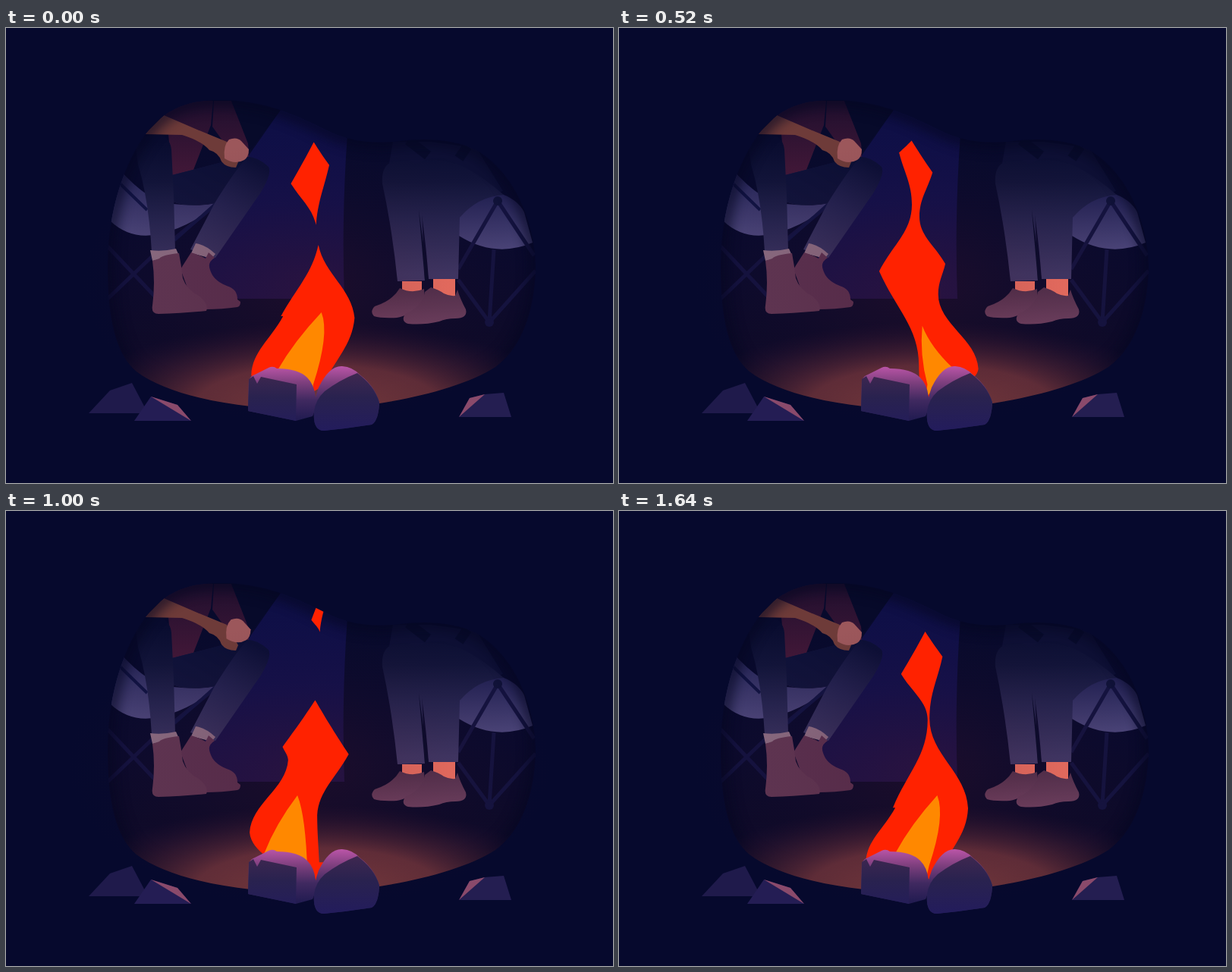
These frames come from a looping animation (800 px wide and 600 px high, 1680 ms). An HTML page:

```html
<!DOCTYPE html>
<html lang="en">
<head>
<meta charset="utf-8">
<title>Campfire</title>
<style>
html, body { margin: 0; width: 100%; height: 100%; overflow: hidden; background: #06092d; }
svg { display: block; width: 100vw; height: 100vh; }
</style>
</head>
<body>
<svg viewBox="0 0 800 600">
<defs>
  <clipPath id="blob"><path id="edge" d="M290 95C245 94 215 103 188 135C155 176 134 245 134 312C134 385 145 430 172 453C215 486 310 503 395 503C480 502 590 482 645 447C685 418 698 360 698 312C696 255 670 190 620 161C590 146 550 145 520 149C480 154 450 148 425 136C385 116 345 97 290 95Z"/></clipPath>
  <linearGradient id="air" x2="0" y2="1"><stop stop-color="#070a2c"/><stop offset=".5" stop-color="#0a0a2d"/><stop offset=".75" stop-color="#0d0a29"/><stop offset="1" stop-color="#170d2b"/></linearGradient>
  <radialGradient id="glow"><stop stop-color="#84403f" stop-opacity=".95"/><stop offset=".5" stop-color="#74363c" stop-opacity=".85"/><stop offset=".75" stop-color="#4a2234" stop-opacity=".5"/><stop offset="1" stop-color="#2a1230" stop-opacity="0"/></radialGradient>
  <radialGradient id="haze"><stop stop-color="#50182c" stop-opacity=".26"/><stop offset=".6" stop-color="#40142a" stop-opacity=".08"/><stop offset="1" stop-color="#301024" stop-opacity="0"/></radialGradient>
  <linearGradient id="tent" x2="0" y2="1"><stop stop-color="#0e0f45"/><stop offset=".5" stop-color="#12104a"/><stop offset="1" stop-color="#1c1146"/></linearGradient>
  <linearGradient id="jean" gradientUnits="userSpaceOnUse" x1="0" y1="150" x2="0" y2="325"><stop stop-color="#090c2f"/><stop offset=".3" stop-color="#121439"/><stop offset=".6" stop-color="#25244f"/><stop offset="1" stop-color="#3f3765"/></linearGradient>
  <linearGradient id="shin" gradientUnits="userSpaceOnUse" x1="325" y1="175" x2="255" y2="298"><stop stop-color="#0c0f36"/><stop offset=".5" stop-color="#232250"/><stop offset="1" stop-color="#393360"/></linearGradient>
  <linearGradient id="seat" x2="0" y2="1"><stop stop-color="#201f50"/><stop offset="1" stop-color="#4a4478"/></linearGradient>
  <linearGradient id="shirt" gradientUnits="userSpaceOnUse" x1="0" y1="96" x2="0" y2="190"><stop stop-color="#200f2e"/><stop offset="1" stop-color="#401737"/></linearGradient>
  <linearGradient id="shoe" x2="0" y2="1"><stop stop-color="#52304c"/><stop offset="1" stop-color="#6d405f"/></linearGradient>
  <linearGradient id="pink" gradientUnits="userSpaceOnUse" x1="0" y1="446" x2="0" y2="515"><stop stop-color="#bb55a8"/><stop offset=".3" stop-color="#80407f"/><stop offset=".65" stop-color="#402960"/><stop offset="1" stop-color="#231c52"/></linearGradient>
  <linearGradient id="stone" gradientUnits="userSpaceOnUse" x1="0" y1="458" x2="0" y2="530"><stop stop-color="#3d2750"/><stop offset=".4" stop-color="#29224f"/><stop offset="1" stop-color="#231c5c"/></linearGradient>
  <filter id="soft" x="-10%" y="-10%" width="120%" height="120%" color-interpolation-filters="sRGB"><feGaussianBlur stdDeviation="8"/></filter>
</defs>
<rect x="-2000" y="-2000" width="4800" height="4800" fill="#06092d"/>
<g clip-path="url(#blob)">
  <rect x="130" y="90" width="575" height="420" fill="url(#air)"/>
  <path d="M362 108L450 140Q442 250 446 357H262V260L322 165Z" fill="url(#tent)"/>

  <!-- left camper -->
  <g fill="none" stroke="#13123f" stroke-width="5"><path d="M134 288L200 358M197 297L133 358M275 234L212 286"/></g>
  <path d="M148 185Q190 232 220 232Q255 236 277 231Q250 259 205 271Q165 281 137 254Z" fill="url(#seat)"/>
  <path d="M148 203L186 240M276 232L222 280" fill="none" stroke="#111342" stroke-width="4"/>
  <path d="M206 115Q235 94 273 96L270 128L247 187L219 194L214 140Z" fill="url(#shirt)"/>
  <path d="M274 96H297L319 150L320 172L290 155L272 130Z" fill="url(#shirt)"/>
  <path d="M297 96L362 108L322 160Z" fill="#070a2a"/>
  <path d="M219 194L296 174Q325 162 346 183Q351 192 335 218L276 303L243 292L275 231Q240 237 220 229Z" fill="url(#shin)"/>
  <path d="M219 194L296 174L318 170Q300 190 275 231Q240 237 220 229Z" fill="#0a0e34" opacity=".8"/>
  <path d="M171 155Q178 139 200 141Q216 143 218 160L221 220L223 293L192 295Q188 225 174 180Z" fill="url(#jean)"/>
  <path d="M208 115L183 140L232 141Q258 149 268 161Q280 164 284 176Q290 184 303 184L306 177L291 150L252 134Z" fill="#6e3b39"/>
  <path id="fist" d="M288 172Q286 155 294 147Q304 143 310 149L320 160Q320 170 314 174Q302 181 288 172Z" fill="#9c575b"/>
  <path d="M250 284Q263 286 276 298L271 304L244 297Z" fill="#8b6c82"/>
  <path d="M244 296Q254 299 263 304L267 296L275 303Q265 309 269 319Q273 333 291 340Q305 344 305 358L309 361Q309 367 305 368Q285 371 262 371L240 345L230 318Z" fill="#5b3150"/>
  <path d="M190 293Q207 295 224 291L228 300Q210 304 193 307Z" fill="#8b6c82"/>
  <path d="M193 307L202 304Q206 299 228 297Q231 313 233 330Q238 345 254 353Q268 364 264 373Q235 376 201 377Q191 377 193 366Q197 335 193 307Z" fill="#603653"/>

  <!-- right camper -->
  <path d="M510 150H560L620 158L655 215L600 235L545 190L505 178Z" fill="#0e1035"/>
  <path d="M530 148L556 168M608 156L597 172" fill="none" stroke="#080b2b" stroke-width="13"/>
  <path d="M596 250Q625 219 648 217Q674 225 683 243L694 283Q645 304 597 274Z" fill="url(#seat)"/>
  <g fill="none" stroke="#14133f" stroke-width="5"><path d="M648 228L596 318M648 228L696 300M643 292L637 388M596 332L637 388L698 320"/></g>
  <circle cx="648" cy="228" r="6" fill="#101238"/><circle cx="637" cy="388" r="6" fill="#14133f"/>
  <path d="M496 205Q494 178 514 175Q530 172 538 178L548 240L552 333L516 334Q509 265 496 205Z" fill="url(#jean)"/>
  <path d="M537 184Q546 170 577 172Q612 182 656 220Q622 222 598 250L596 331L557 331Q551 250 537 184Z" fill="url(#jean)"/>
  <path d="M544 240L552 333H557Z" fill="#080b2b"/>
  <path d="M522 334H548V350H522Z" fill="#ee7061"/>
  <path d="M519 343Q535 351 551 344L552 362Q530 380 515 382Q494 383 485 380Q479 374 486 367Q509 360 519 343Z" fill="url(#shoe)"/>
  <path d="M563 331H592V358L563 350Z" fill="#ee7061"/>
  <path id="foot" d="M560 342Q570 345 577 350Q585 354 592 353L595 345Q598 356 606 371Q609 383 592 383Q580 383 571 387Q550 392 530 390Q520 387 526 377Q549 367 552 348Z" fill="url(#shoe)"/>

  <use href="#edge" fill="none" stroke="#050722" stroke-width="18" opacity=".7" filter="url(#soft)"/>
  <ellipse id="glowing" cx="412" cy="502" rx="330" ry="115" fill="url(#glow)"/>
</g>
<ellipse id="halo" cx="400" cy="335" ry="190" fill="url(#haze)"/>
<g clip-path="url(#blob)">
  <path id="red" fill="#ff2200"/>
  <path id="spark" fill="#ff2200"/>
  <path id="core" fill="#ff8800"/>
</g>

<!-- stones -->
<path d="M109 508L137 478L166 468L187 508Z" fill="#1f1a4b"/>
<path d="M169 518L191 486L226 497L244 518Z" fill="#241d54"/>
<path d="M191 486L226 497L244 518Z" fill="#8a4a6b"/>
<path d="M597 513L611 488L631 483L656 481L666 513Z" fill="#241e51"/>
<path d="M597 513L611 488L631 483Z" fill="#8a4a6b"/>
<path d="M319 505L320 465Q322 459 328 457L346 448Q352 445 357 449Q385 449 397 461Q406 470 408 486Q409 502 404 512L382 518Z" fill="url(#pink)"/>
<path d="M319 505L320 463L326 459L331 469L336 460L383 470L382 518Z" fill="url(#stone)"/>
<path d="M406 505Q406 490 412 474Q426 445 443 446Q457 447 466 457Q486 472 492 494Q491 518 482 523Q450 528 419 531Q404 531 406 505Z" fill="url(#pink)"/>
<path d="M406 505Q408 490 420 479Q440 464 463 455Q486 472 492 494Q491 518 482 523Q450 528 419 531Q404 531 406 505Z" fill="url(#stone)"/>
</svg>
<script>
const LOOP = 1680, STEP = 40, CYCLE = 2500 / 3, AXIS = 397.3, FLOOR = 488;
const { PI, sin, cos, min, max } = Math;
const $ = id => document.getElementById(id);
const clamp = (v, lo = 0, hi = 1) => min(hi, max(lo, v));
const set = (id, attrs) => { for (const k in attrs) $(id).setAttribute(k, attrs[k]); };
const fmt = (...v) => v.map(n => n.toFixed(2)).join(" ");

// Two tongues climb in turn, mirror images of each other.
// Each ends at the top in a pinch, where it parts from the tongue above.
const A = { born: 327, flip: true, drop: 11, pinch: { t: 620, x: 391, y: 206, outer: 1, fall: .43 } };
const B = { born: 807, flip: false, drop: 0, pinch: { t: 813, x: 408, y: 272, outer: -1, fall: .59 } };

// Lean is 0 for an upright tangent and grows for a sharp corner.
const node = (x, y, lean) => ({ x, y, lean });

function tongue({ born, flip, drop, pinch }, t) {
  const a = t - born, young = a < 0;
  const inner = young
    ? node(min(408, 361 - .13 * a), min(FLOOR, 391 - .45 * a), .42)
    : node(362 + .013 * a, 391 - .415 * a, .42);
  const outer = young
    ? node(460 + 15 * sin(PI * clamp(-a / 450)), min(FLOOR, 392 - .2 * a), .04)
    : node(460 - .02 * a - .00012 * a * a, 392 - .369 * a, .42 * clamp(a / 150, .1));
  const tip = node(412 - .01 * a - .00007 * a * a, 291 - drop - .19 * a - .00013 * a * a,
    .14 + .24 * clamp((t - pinch.t) / 190));
  if (flip) for (const n of [inner, outer, tip]) n.x = 2 * AXIS - n.x;
  return { tip, left: flip ? outer : inner, right: flip ? inner : outer };
}

// The waist above a tongue closes at a steady pace until it pinches off.
function waist({ pinch }, t) {
  const s = max(0, pinch.t - t), lean = .4 * clamp((s - 430) / 170);
  const side = dir => node(pinch.x + dir * (1 + .04 * s),
    min(FLOOR, pinch.y + s * (dir === pinch.outer ? pinch.fall : .27)), lean);
  return { left: side(-1), right: side(1) };
}

function outline(nodes) {
  let d = `M${fmt(nodes[0].x, nodes[0].y)}`;
  nodes.slice(1).forEach((b, i) => {
    const a = nodes[i], dx = b.x - a.x, dy = b.y - a.y;
    d += "C" + fmt(a.x + dx * a.lean, a.y + dy * .4, b.x - dx * b.lean, b.y - dy * .4, b.x, b.y);
  });
  return d + "Z";
}

// Keeps each waist between the bends above and below it.
function edge(rows, side) {
  const list = rows.map(r => r[side]);
  for (let i = 1; i < list.length; i += 2)
    list[i].y = max(list[i - 1].y, min(list[i].y, list[i + 1].y));
  return list;
}

function flame(p) {
  const parted = p > A.pinch.t, next = p + CYCLE;
  const rows = [tongue(A, p), waist(B, p), tongue(B, p), waist(A, p - 0), tongue(A, p - CYCLE)];
  rows[3] = waist({ pinch: { ...A.pinch, t: A.pinch.t + CYCLE } }, p);
  if (!parted) rows.unshift(tongue(B, next), waist(A, p));
  const { tip } = rows[0];
  set("red", { d: outline([tip, ...edge(rows, "left"), node(408, 490, .4), ...edge(rows, "right").reverse(), tip]) });

  // The loose piece above keeps rising while its foot is drawn up.
  const loose = tongue(parted ? B : A, next), from = (parted ? A : B).pinch;
  const since = parted ? p - from.t : next - from.t;
  const foot = node(from.x - from.outer * .03 * since, from.y - .6 * since, .14);
  set("spark", { d: since < 290 ? outline([loose.tip, loose.left, foot, loose.right, loose.tip]) : "" });
}

function core(p) {
  const wave = peak => cos(2 * PI * (p - peak) / CYCLE);
  const sink = max(0, wave(600)) ** 2;
  const tx = 398 + 27 * wave(720), ty = 375 + 26 * sink;
  const lx = 374 + 34 * wave(560), ly = 451 + 28 * sink;
  const rx = 418 + 22 * wave(540), ry = 462 - 14 * wave(540);
  set("core", { d: `M${fmt(tx, ty)}Q${fmt(tx + 11, ty + 28, rx, ry)}L404 488L${fmt(lx, ly)}Q${fmt((lx + tx) / 2 - 7, (ly + ty) / 2, tx, ty)}Z` });
}

function draw(t) {
  const p = t % CYCLE;
  flame(p > B.pinch.t ? p - CYCLE : p);
  core(p);

  const bump = (mid, width) => cos(PI * clamp((t - mid) / width, -.5, .5));
  const tap = bump(200, 240), lift = bump(1120, 640);
  set("foot", { transform: `translate(${fmt(-3 * tap, -6 * tap)})` });
  set("fist", { transform: `translate(${fmt(3 * lift, -4.5 * lift)})` });

  const light = .5 - .5 * cos(2 * PI * t / (LOOP / 3));
  set("glowing", { opacity: .93 + .07 * light });
  set("halo", { rx: 300 + 50 * light });
}

const start = performance.now();
function tick() {
  const t = (performance.now() - start) % LOOP;
  draw(Math.floor(t / STEP) * STEP);
  requestAnimationFrame(tick);
}
tick();
</script>
</body>
</html>
```
